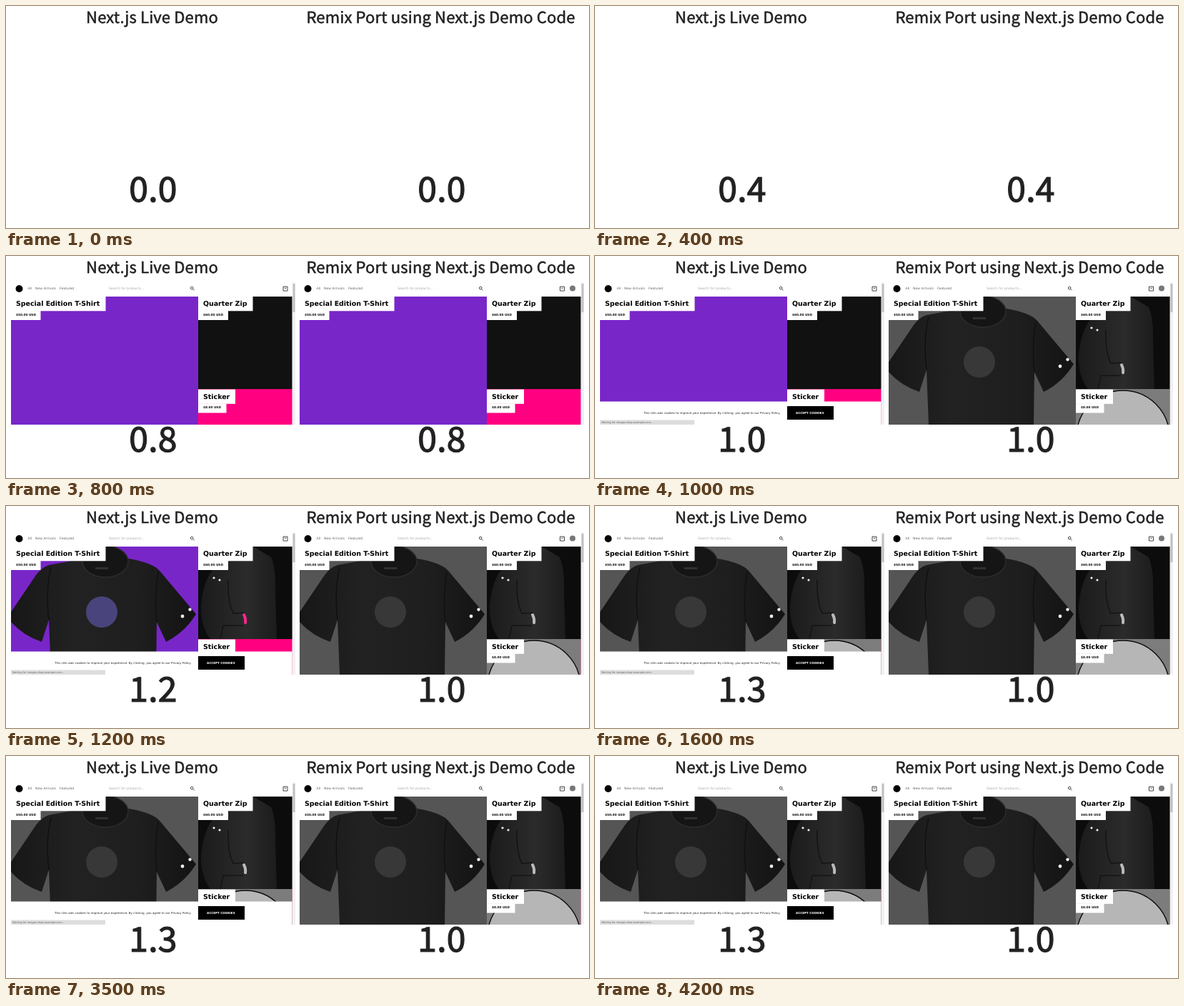
An HTML page for the animation above (4.3 s loop, 816 by 312 pixels).

```html
<!DOCTYPE html>
<html lang="en">
<head>
<meta charset="utf-8">
<title>Load time comparison</title>
<style>
  html, body { margin: 0; width: 100%; height: 100%; overflow: hidden; background: #fff; }
  svg { display: block; width: 816px; height: 312px; }
  text { font-family: "DejaVu Sans", sans-serif; font-size: 4.6px; fill: #666; text-rendering: geometricPrecision; white-space: pre; }
  .title, .count {
    font-family: "Noto Sans CJK JP", "Noto Sans CJK SC", "Noto Sans CJK", sans-serif;
    fill: #222; stroke: #222; text-anchor: middle;
  }
  .title { font-size: 22px; letter-spacing: .15px; stroke-width: .55px; }
  .count { font-size: 48px; letter-spacing: .3px; stroke-width: 1.2px; }
  .name { font-size: 9.45px; font-weight: bold; fill: #000; }
  .price { font-size: 4.26px; font-weight: bold; fill: #111; }
  .hint { fill: #aaa; }
  .icon { fill: none; stroke: #333; stroke-width: .9; }
  .photos { --print: #4a447c; --band: #f5288c; }
  .photos.gray { --print: #383838; --band: #bbb; }
</style>
</head>
<body>
<svg viewBox="0 0 816 312">
  <defs>
    <clipPath id="shirtArea"><path d="M7 57H269V237H7z"/></clipPath>
    <clipPath id="zipArea"><path d="M269 57H400.5V187H269z"/></clipPath>
    <clipPath id="stickerArea"><path d="M269 187H400.5V237H269z"/></clipPath>
    <linearGradient id="cloth">
      <stop offset="0" stop-color="#171717"/>
      <stop offset=".35" stop-color="#222"/>
      <stop offset=".7" stop-color="#1e1e1e"/>
      <stop offset="1" stop-color="#131313"/>
    </linearGradient>
    <linearGradient id="fleece">
      <stop offset="0" stop-color="#1b1b1b"/>
      <stop offset=".6" stop-color="#2b2b2b"/>
      <stop offset="1" stop-color="#1c1c1c"/>
    </linearGradient>
  </defs>
</svg>
<script>
const LOOP = 4300, STEP = 100;
const svg = document.querySelector("svg");

const rect = (x, y, x2, y2, fill) =>
  `<rect x="${x}" y="${y}" width="${x2 - x}" height="${y2 - y}" fill="${fill}"/>`;
const dot = (x, y, r, fill) => `<circle cx="${x}" cy="${y}" r="${r}" fill="${fill}"/>`;
const text = (x, y, cls, str, style = "") =>
  `<text x="${x}" y="${y}" class="${cls}" style="${style}">${str}</text>`;
const tag = (x, y, w, name, priceW, price) =>
  rect(x, y, x + w, y + 20.3, "#fff") + rect(x, y + 20, x + priceW, y + 33, "#fff") +
  text(x + 7, y + 13, "name", name) + text(x + 7, y + 26.8, "price", price);

const header = cartX =>
  dot(18.5, 46, 5, "#000") +
  text(30.5, 47.2, "", "All") + text(41, 47.2, "", "New Arrivals") + text(75, 47.2, "", "Featured") +
  text(144, 47.2, "hint", "Search for products...") +
  `<path class="icon" d="M261.6 46.4L263.6 48.4M262 45a1.8 1.8 0 1 1-3.6 0a1.8 1.8 0 1 1 3.6 0"/>
   <path class="icon" d="M${cartX - 3} 43h6v6h-6zM${cartX - 1.3} 44.8q1.3 1.6 2.6 0"/>` +
  rect(401, 37, 405, 237, "#f1f1f1") + rect(401.5, 39, 404.5, 79, "#c1c1c1");

const blocks =
  rect(7, 57, 269, 237, "#7926c9") + rect(269, 57, 400.5, 187, "#111") + rect(269, 187, 400.5, 237, "#ff0080");

const grayBlocks =
  rect(7, 57, 269, 237, "#555") + rect(269, 187, 400.5, 237, "#7c7c7c") +
  `<g clip-path="url(#stickerArea)"><circle cx="335" cy="254" r="65" fill="#b6b6b6" stroke="#0c0c0c" stroke-width="1.4"/></g>`;

const shirt = `<g clip-path="url(#shirtArea)">
  <path fill="url(#cloth)" d="M60 83L108 74Q130 63 150 65L172 74Q206 80 215 91L266 152Q250 178 224 191L211 163L210 237H63L60 160L50 191Q24 182 7 163V149L42 97Q50 86 60 83z"/>
  <path fill="none" stroke="#101010" stroke-width="1.4" d="M63 86Q55 120 60 160M213 92Q207 130 211 163"/>
  <ellipse cx="139" cy="78" rx="32" ry="22" fill="#151515" stroke="#2c2c2c" stroke-width="1.5"/>
  ${rect(125, 86, 143, 89, "#303030")}
  ${dot(134, 149, 22, "var(--print)")}${dot(247, 155, 2.4, "#eee")}${dot(257.5, 145.5, 2.2, "#eee")}
</g>`;

const zip = `<g clip-path="url(#zipArea)">
  ${rect(269, 57, 400.5, 187, "#0c0c0c")}
  <path fill="url(#fleece)" d="M310 57H346L371 72Q378 88 377 120L379 187H286Q272 168 273 140Q276 104 292 86z"/>
  <path fill="none" stroke="#141414" stroke-width="1.6" d="M311 104Q310 135 318 151L333 150M300 187L304 168H332"/>
  <path fill="none" stroke="var(--band)" stroke-width="4" stroke-linecap="round" d="M333 153Q336 159 335 164"/>
  ${dot(291, 101, 1.6, "#eee")}${dot(299, 104, 1.6, "#eee")}
</g>`;

const tags =
  tag(7, 57, 132.5, "Special Edition T-Shirt", 41.5, "$50.00 USD") +
  tag(269, 57, 76.5, "Quarter Zip", 42, "$60.00 USD") +
  tag(269, 187.5, 52, "Sticker", 39.5, "$8.00 USD");

const banner =
  rect(7, 204.5, 400.5, 237, "#fff") + rect(269, 211, 334, 230, "#000") +
  text(68, 222, "", "This site uses cookies to improve your experience. By clicking, you agree to our Privacy Policy.", "font-size:4.05px;fill:#222") +
  text(281, 222, "price", "ACCEPT COOKIES", "font-size:4.1px;fill:#fff") +
  rect(7, 230.5, 139, 237, "#ddd") +
  text(9, 235, "", "Waiting for images.shop.example.com...", "font-size:3.6px");

// Times are in tenths of a second.
function addPanel({ x, title, cartX, extra = "", ...times }) {
  const panel = document.createElementNS("http://www.w3.org/2000/svg", "g");
  panel.setAttribute("transform", `translate(${x} 0)`);
  panel.innerHTML =
    text(204.5, 24, "title", title) +
    `<g class="page">${header(cartX)}${extra}${blocks}
      <g class="photos"><g class="tint">${grayBlocks}</g>${shirt}${zip}</g>
      ${tags}<g class="banner">${banner}</g></g>` +
    text(206, 275, "count", "0.0");
  svg.append(panel);

  const part = name => panel.querySelector("." + name);
  const [page, photos, tint, notice, count] = ["page", "photos", "tint", "banner", "count"].map(part);
  const show = (node, on) => { node.style.display = on ? "" : "none"; };

  return tick => {
    show(page, tick >= times.page);
    show(photos, tick >= times.photos);
    show(tint, tick >= times.done);
    show(notice, tick >= times.banner);
    photos.classList.toggle("gray", tick >= times.done);
    count.textContent = (Math.min(tick, times.done) / 10).toFixed(1);
  };
}

const panels = [
  addPanel({ x: 0, title: "Next.js Live Demo", cartX: 391, page: 5, photos: 12, done: 13, banner: 10 }),
  addPanel({ x: 404, title: "Remix Port using Next.js Demo Code", cartX: 374.5,
    extra: dot(389, 45.5, 4, "#777"), page: 5, photos: 9, done: 10, banner: Infinity }),
];

function draw() {
  const tick = Math.floor(performance.now() % LOOP / STEP);
  panels.forEach(update => update(tick));
  requestAnimationFrame(draw);
}
draw();
</script>
</body>
</html>
```
